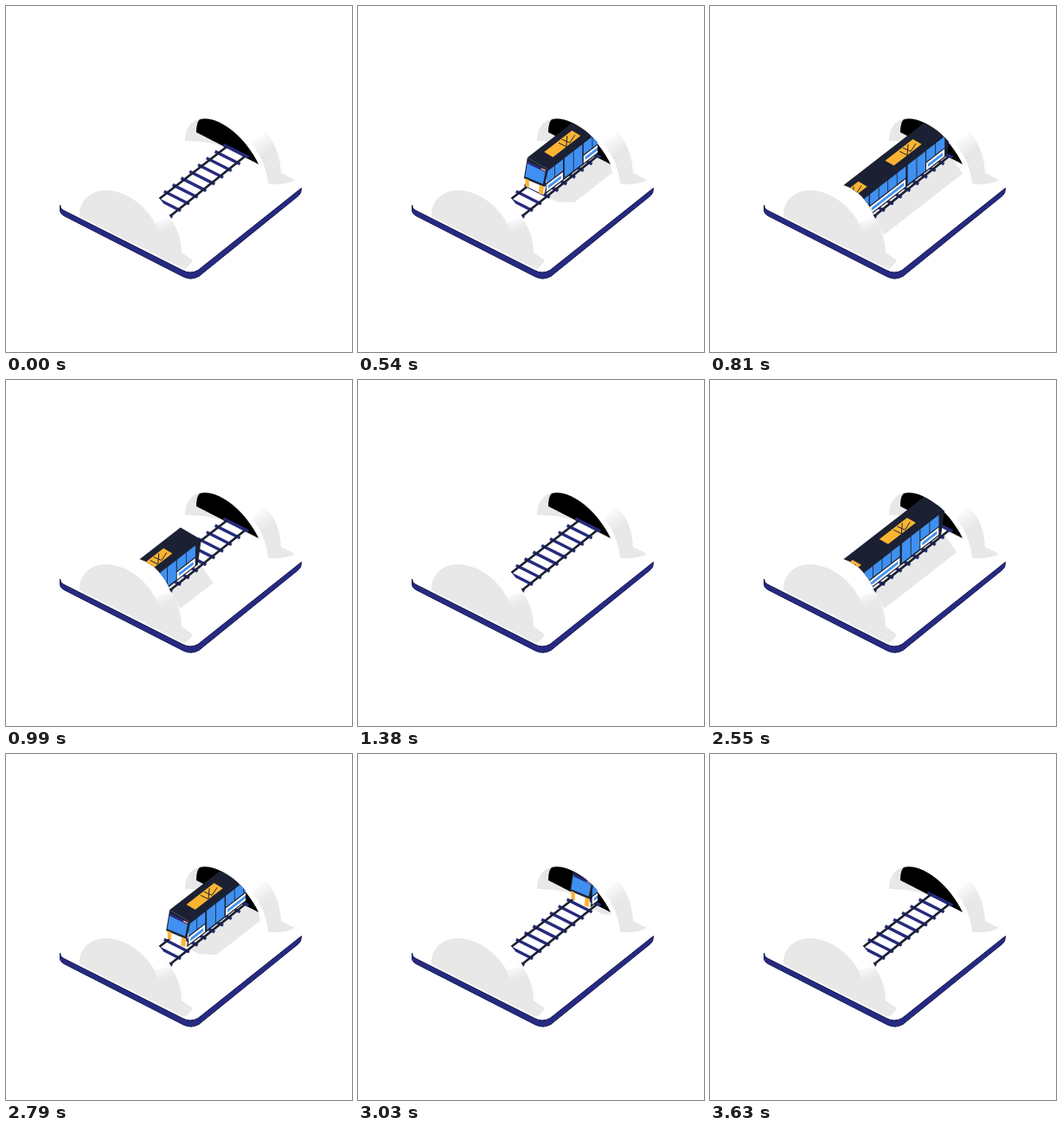
These frames come from a looping animation (400 by 400 pixels, 3660 ms). An HTML page:

```html
<!DOCTYPE html>
<html>
<head>
<meta charset="utf-8">
<title>Tram shuttle</title>
<style>
  html, body { margin: 0; width: 100%; height: 100%; overflow: hidden; background: #fff; }
  svg { display: block; width: 100%; height: 100%; }
</style>
</head>
<body>
<svg viewBox="0 0 400 400">
  <defs>
    <clipPath id="nearMouth">
      <path d="M100 100H400V310H216V293L204 270 190 244C184 227 172 213 154 207L100 190Z"/>
    </clipPath>
    <clipPath id="farMouth">
      <path d="M100 140H220Q220 134 224 131C242 128 264 142 277 158V310H100Z"/>
    </clipPath>
    <clipPath id="ground">
      <path d="M150 310V215L252 162 292 183 294 193V310Z"/>
    </clipPath>
    <linearGradient id="farShade" gradientUnits="userSpaceOnUse" x1="289" y1="149" x2="302" y2="169">
      <stop offset="0" stop-color="#fff"/><stop offset="1" stop-color="#e8e8e8"/>
    </linearGradient>
    <linearGradient id="nearLight" gradientUnits="userSpaceOnUse" x1="177" y1="243" x2="184" y2="260">
      <stop offset="0" stop-color="#fff"/><stop offset="1" stop-color="#fff" stop-opacity="0"/>
    </linearGradient>
  </defs>

  <!-- board edge -->
  <path fill="#262a82" stroke="#14174f" stroke-width="1"
    d="M62.5 230V237Q63 240 67 242.5L205 313Q214 317.500 223 312.500L338 219.500Q341.500 217 341.500 210.500L222 305.500Q213 310.500 204 305.500L66 236Q62.500 234 62.500 230Z"/>

  <g clip-path="url(#nearMouth)">
    <g clip-path="url(#ground)">
      <path class="moving" fill="#e8e8e8" d="M206 213L230 226 250 227 368 135 352 112Z"/>
    </g>
    <path fill="#e8e8e8" d="M207 156C207 142 213 134 222 131L220 146 252 163Q234 156 207 156Z"/>
    <path d="M220 146Q220 134 224 131C245 126 276 150 292 183Z"/>
    <path fill="url(#farShade)" d="M299 146C312 158 317 175 318 193L334 201Q327 207 303 206Q301 180 284 160Z"/>
    <g id="track"></g>
    <g clip-path="url(#farMouth)"><g class="moving" id="tram"></g></g>
  </g>

  <!-- near tunnel -->
  <path fill="#e8e8e8" d="M85 243C84 228 95 213 116 213C140 214 160 230 172 250L190 245C198 257 203 270 203 285L216 294Q212 301 206 304Z"/>
  <path fill="url(#nearLight)" d="M170 246L190 244 197 256 188 263 176 260Z"/>
</svg>
<script>
const INK = '#1b2133', NAVY = '#262a7f', BLUE = '#3f90f0', GOLD = '#fab432';
const SLOPE = 0.775, LENGTH = 134, TRAVEL = 327, LOOP = 3660;
const $ = id => document.getElementById(id);

const poly = (pts, fill) => `<polygon points="${pts.join(' ')}" fill="${fill}"/>`;
const line = (d, stroke, width) => `<path d="${d}" fill="none" stroke="${stroke}" stroke-width="${width}"/>`;

// Track
let track = '';
for (let i = -1; i < 9; i++) {
  track += line(`M${173 + 9.8 * i} ${222 - 7.7 * i}l29 14.7`, NAVY, 3.5);
}
track += line('M172 227L256 162M186 246L276 174', INK, 2.8);
$('track').innerHTML = track;

// Side panel: from and to along the tram, low and high above the ground
function side(from, to, low, high, fill) {
  const at = (a, h) => [216 + a, 218 - SLOPE * a - h];
  return poly([at(from, low), at(to, low), at(to, high), at(from, high)], fill);
}

// Roof point: distance along, fraction across
const roof = (a, c) => [196 + a + 24 * c, 175 - SLOPE * a + 14 * c];

function pantograph(a) {
  const [x, y] = roof(a + 18, 0.5);
  return poly([roof(a, 0.27), roof(a + 32, 0.27), roof(a + 32, 0.69), roof(a, 0.69)], GOLD) +
    line(`M${x - 7} ${y}l10 5 12-9M${x - 3} ${y - 4}l9 4 6-9M${x + 3} ${y - 8}l-1 12`, INK, 1);
}

let tram = poly([roof(0, 0), roof(LENGTH, 0), roof(LENGTH, 1), roof(0, 1)], INK) +
  poly([[216, 218], [216 + LENGTH, 218 - SLOPE * LENGTH], roof(LENGTH, 1), roof(0, 1)], INK);

// Windows above white panels
for (const [from, to] of [[2, 22], [45, 87], [110, 132]]) {
  const step = (to - from) / Math.round((to - from) / 10.5);
  for (let a = from; a < to - 1; a += step) tram += side(a, a + step - 0.8, 11.5, 24.5, BLUE);
  tram += side(from, to - 1, 1.5, 10, '#fff') + side(from + 2, to - 3, 4, 7.5, BLUE);
}
// Doors
for (const a of [23, 88.5]) {
  tram += side(a, a + 10, 2, 24.5, BLUE) + side(a + 10.8, a + 20.5, 2, 24.5, BLUE);
}

// Front
tram += poly([[194, 195], [215, 206], [215, 218], [194, 208]], '#fff') +
  poly([roof(0, 0), roof(0, 1), [216, 209], [192, 199]], INK) +
  poly([[196, 181], [217, 191], [214, 205.5], [193.5, 197]], BLUE) +
  poly([[196, 179], [217, 189], [217, 192], [196, 182]], NAVY) +
  poly([[212, 187], [217, 189], [217, 191], [212, 189]], '#d9957a') +
  poly([[193.5, 199], [198, 201], [198, 210], [194, 208]], GOLD) +
  poly([[210, 206.5], [215, 208.5], [214, 218], [209, 216]], GOLD);

tram += pantograph(13) + pantograph(76);
$('tram').innerHTML = tram;

const ease = p => {
  p = Math.min(1, Math.max(0, p));
  return p * p * (3 - 2 * p);
};
const moving = document.querySelectorAll('.moving');

function draw() {
  const t = performance.now() % LOOP;
  const progress = ease(t / 1670) - ease((t - 1800) / 1500);
  const x = 80.5 - TRAVEL * progress;
  for (const el of moving) el.setAttribute('transform', `translate(${x} ${-SLOPE * x})`);
  requestAnimationFrame(draw);
}
draw();
</script>
</body>
</html>
```
